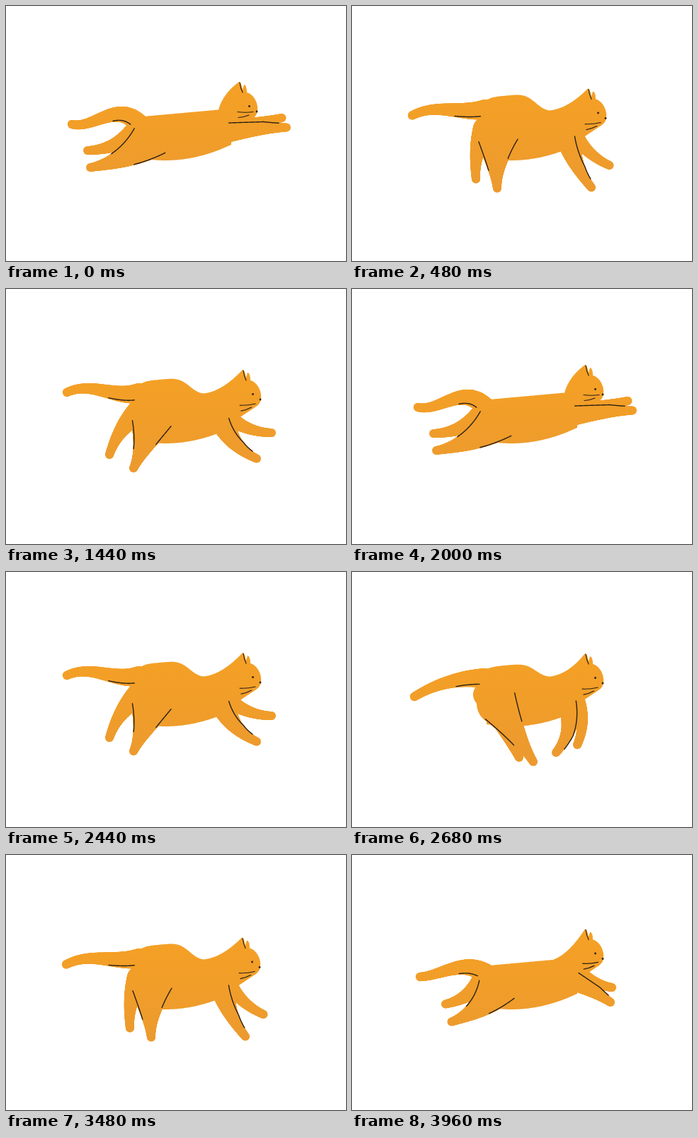
Animation of 480x360 px, one loop 4 s. Source, as an HTML page with a canvas:

```html
<!DOCTYPE html>
<html lang="en">
<head>
<meta charset="utf-8">
<title>Running cat</title>
<style>
  html, body { margin: 0; width: 100%; height: 100%; overflow: hidden; background: #fff; }
  canvas { display: block; width: 480px; height: 360px; }
</style>
</head>
<body>
<canvas id="stage" width="480" height="360"></canvas>
<script>
const ctx = document.getElementById('stage').getContext('2d');
const INK = '#2a2015';
const STRIDE = 1000, DRAWINGS = 15, TICK = 40;

const fur = ctx.createLinearGradient(0, 130, 0, 255);
fur.addColorStop(0, '#f4a026');
fur.addColorStop(1, '#ec9a2e');

// arch: height of the back; lean: how far the head is lowered; head: nose offset.
// Limbs: tip x, tip y, bend near the root, bend near the tip (as parts of the limb's length).
const stretch = {
  arch: 0, lean: 0, head: [0, 0], tail: [93, 167, 0.37, -0.075],
  nearHind: [119, 228, -0.1, -0.1], farHind: [115, 204, -0.13, -0.13],
  nearFore: [396, 171.5, 0, 0], farFore: [389.5, 158, 0, 0]
};
const reach = {
  arch: 1, lean: 1, head: [5, 7], tail: [86, 146, -0.085, 0.165],
  nearHind: [180, 253, -0.03, -0.03], farHind: [146, 234, 0.1, 0.1],
  nearFore: [354, 239.5, 0.15, 0.15], farFore: [375, 203, 0.11, 0.11]
};
const land = {
  arch: 1.1, lean: 1, head: [3, 12], tail: [84, 163, 0, 0.12],
  nearHind: [230, 262, 0.08, 0.08], farHind: [204, 255, 0.08, 0.08],
  nearFore: [322, 273, 0.03, 0.03], farFore: [352, 247, 0.1, 0.1]
};
const gather = {
  arch: 0.85, lean: 1, head: [0, 8], tail: [88, 176, 0.1, 0.1],
  nearHind: [256, 268, 0, 0], farHind: [236, 262, 0, 0],
  nearFore: [288, 255, -0.15, -0.15], farFore: [318, 244, -0.15, -0.15]
};
const push = {
  arch: 0.4, lean: 0.9, head: [0, 3], tail: [92, 178, 0.18, 0.03],
  nearHind: [190, 267, -0.1, -0.1], farHind: [172, 253, -0.05, -0.05],
  nearFore: [349, 233, 0.05, 0.05], farFore: [362, 208, 0.05, 0.05]
};
const leap = {
  arch: 0, lean: 0.8, head: [0, -2.5], tail: [96, 172, 0.25, 0],
  nearHind: [140.5, 235.5, -0.11, -0.11], farHind: [132, 210.5, -0.13, -0.13],
  nearFore: [365, 208, 0, 0], farFore: [367, 187, 0.07, 0.07]
};

function mix(a, b, u) {
  if (typeof a === 'number') return a + (b - a) * u;
  if (Array.isArray(a)) return a.map((v, i) => mix(v, b[i], u));
  return Object.fromEntries(Object.keys(a).map(k => [k, mix(a[k], b[k], u)]));
}

// The tail swings out past its landing place on the way down.
const fall = { ...mix(stretch, reach, 0.42), tail: [79.5, 153, 0.15, 0.08] };

const KEYS = [[0, stretch], [1, stretch], [5, fall], [6, reach], [8, land],
              [10, gather], [12, push], [14, leap], [15, stretch]];

function poseAt(drawing) {
  const i = KEYS.findIndex(([end]) => end > drawing);
  const [start, from] = KEYS[i - 1], [end, to] = KEYS[i];
  return mix(from, to, (drawing - start) / (end - start));
}

const backY = (x, arch) => 155 - (x - 205) * 0.09 - 26 * arch * Math.exp(-(((x - 218) / 45) ** 4));
const bellyY = x => 218 - 0.00258 * (x - 225) ** 2;

// Samples a tapering limb from root to tip, with the unit normal at each sample.
function limb([rx, ry], [tx, ty, rootBend, tipBend], rootR, tipR) {
  const dx = tx - rx, dy = ty - ry, count = 120;
  const bowed = (u, bend) => [rx + dx * u - dy * bend, ry + dy * u + dx * bend];
  const points = [[rx, ry], bowed(1 / 3, rootBend), bowed(2 / 3, tipBend), [tx, ty]];
  return Array.from({ length: count + 1 }, (_, i) => {
    const u = i / count, v = 1 - u;
    const [x, y] = [0, 1].map(k => v * v * v * points[0][k] + 3 * v * v * u * points[1][k] +
      3 * v * u * u * points[2][k] + u * u * u * points[3][k]);
    const [sx, sy] = [0, 1].map(k => v * v * (points[1][k] - points[0][k]) +
      2 * v * u * (points[2][k] - points[1][k]) + u * u * (points[3][k] - points[2][k]));
    const len = Math.hypot(sx, sy);
    return { x, y, r: tipR + (rootR - tipR) * v ** 1.5, nx: -sy / len, ny: sx / len };
  });
}

function buildLimbs(pose) {
  const a = pose.arch;
  const shoulder = [315 - 9 * a, 174 + 11 * a];
  return {
    tail: limb([188, 167 - 20 * a], pose.tail, 14, 6.2),
    farHind: limb([188, 173], pose.farHind, 17, 6),
    farFore: limb([shoulder[0] + 10, shoulder[1] - 3], pose.farFore, 11, 6),
    nearHind: limb([205, 186], pose.nearHind, 29, 6),
    nearFore: limb(shoulder, pose.nearFore, 18, 6)
  };
}

function disc(x, y, r) {
  ctx.beginPath();
  ctx.arc(x, y, r, 0, Math.PI * 2);
  ctx.fill();
}

function torso(arch) {
  const left = 190, right = 318;
  ctx.beginPath();
  for (let x = left; x <= right; x += 2) ctx.lineTo(x, backY(x, arch));
  for (let x = right; x >= left; x -= 2) ctx.lineTo(x, bellyY(x));
  ctx.fill();
}

function headShape({ arch, lean, head: [dx, dy] }) {
  const nape = 300 - 20 * lean, x = 354 + dx, y = 149 + dy;
  ctx.beginPath();
  ctx.moveTo(nape, backY(nape, arch));
  ctx.quadraticCurveTo(306, 124 + 20 * lean, x - 25, y - 42);
  ctx.quadraticCurveTo(x - 22, y - 42, x - 20, y - 31);
  ctx.lineTo(x - 18, y - 38);
  ctx.quadraticCurveTo(x - 14, y - 37, x - 14, y - 27);
  ctx.bezierCurveTo(x - 5, y - 25, x + 3, y - 12, x + 1, y);
  ctx.quadraticCurveTo(x, y + 7, x - 9, y + 12);
  ctx.lineTo(x - 30, y + 26);
  ctx.lineTo(nape + 8, y + 26);
  ctx.fill();
}

function curve(x0, y0, cx, cy, x1, y1) {
  ctx.beginPath();
  ctx.moveTo(x0, y0);
  ctx.quadraticCurveTo(cx, cy, x1, y1);
  ctx.stroke();
}

function face({ lean, head: [dx, dy] }) {
  ctx.save();
  ctx.translate(354 + dx, 149 + dy);
  ctx.lineWidth = 1.2;
  curve(-24, -41, -23, -33, -20, -27);
  disc(-10.5, -7.5, 1.4);
  disc(0, 0, 1.4);
  ctx.translate(-2 * lean, 5 * lean);
  ctx.rotate(-0.1 * lean);
  curve(-27, 0.5, -16, 2, -5, 0.5);
  curve(-26, 8.5, -18, 8, -11, 5);
  ctx.restore();
}

// Inks one side of a limb between two parts of its length, at most `reach` from its middle.
function edge(samples, side, from, to, reach = Infinity) {
  const last = samples.length - 1;
  ctx.lineWidth = 1.4;
  ctx.beginPath();
  for (const { x, y, r, nx, ny } of samples.slice(from * last, to * last)) {
    const d = side * Math.min(r, reach);
    ctx.lineTo(x + nx * d, y + ny * d);
  }
  ctx.stroke();
}

function draw(pose) {
  const limbs = buildLimbs(pose);
  ctx.fillStyle = '#fff';
  ctx.fillRect(0, 0, 480, 360);
  ctx.fillStyle = fur;
  for (const samples of Object.values(limbs)) {
    for (const { x, y, r } of samples) disc(x, y, r);
  }
  torso(pose.arch);
  headShape(pose);

  ctx.fillStyle = ctx.strokeStyle = INK;
  ctx.lineCap = 'round';
  edge(limbs.tail, -1, 0.08, 0.42, 8.5);
  edge(limbs.nearHind, 1, 0.1, 0.65);
  edge(limbs.nearHind, -1, 0, 0.42);
  edge(limbs.nearFore, -1, 0, 0.88, 9);
  face(pose);
}

const start = performance.now();
function tick() {
  const t = Math.floor((performance.now() - start) % STRIDE / TICK) * TICK;
  draw(poseAt(Math.max(0, Math.ceil(t * DRAWINGS / STRIDE) - 1)));
  requestAnimationFrame(tick);
}
tick();
</script>
</body>
</html>
```
